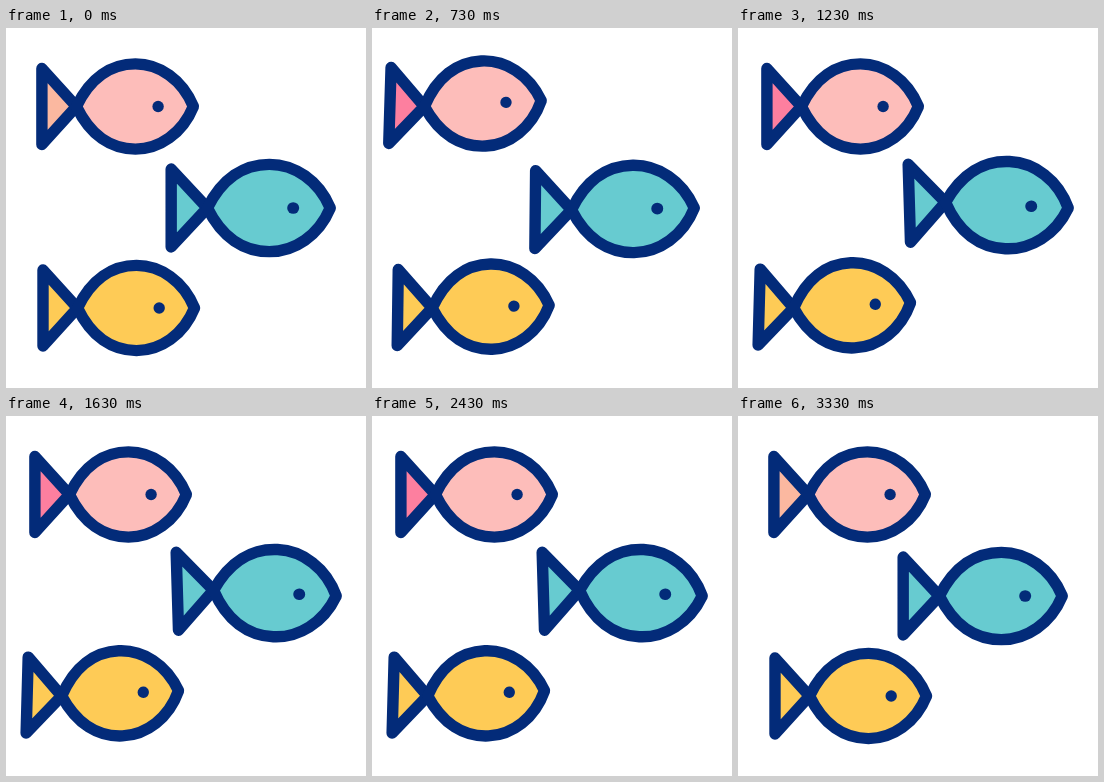
Recreate the animation shown at these times as an HTML page without scripts. Size 360 by 360 pixels, loop 3.7 s.

```html
<!DOCTYPE html>
<html lang="en">
<head>
<meta charset="utf-8">
<title>Three swimming fish</title>
<style>
  @property --frame {
    syntax: "<number>";
    inherits: true;
    initial-value: 0;
  }

  html, body {
    margin: 0;
    width: 100%;
    height: 100%;
    overflow: hidden;
    background: #fff;
  }

  svg {
    display: block;
    width: 100vw;
    height: 100vh;
  }

  /* Each fish sways on a 12-frame wave that builds up, holds and settles. */
  .fish {
    --grow: pow(clamp(0, var(--frame) / 18, 1), var(--ramp));
    --settle: pow(clamp(0, (100 - var(--frame)) / 11, 1), 2);
    --amp: calc(var(--grow) * var(--settle));
    --wave: cos((var(--frame) - var(--peak)) * 30deg);
    --tilt: calc(2.9deg * var(--amp) * var(--wave));
    animation: swim 3700ms -4ms infinite;
  }

  @keyframes swim {
    from { --frame: 0; animation-timing-function: steps(100); }
    90%, to { --frame: 100; }
  }

  .pink {
    --peak: 4; --ramp: 2; --drift: -7px; --sway: 11px; --pivot: 0px;
    --skin: #fdbdba;
    --fin: color-mix(in srgb, #fd7f9f calc(var(--amp) * 100%), #fbb8a0);
  }
  .teal {
    --peak: 1.6; --ramp: 4; --drift: 0px; --sway: 6px; --pivot: 117px;
    --skin: #67cbd0; --fin: #67cbd0;
  }
  .yellow {
    --peak: 6.1; --ramp: 1; --drift: -6.5px; --sway: 10.5px; --pivot: 0px;
    --skin: #fecb56; --fin: #fecb56;
  }

  .swimmer {
    transform-origin: var(--pivot) 0px;
    transform:
      translateX(calc(var(--amp) * (var(--drift) + var(--sway) * var(--wave))))
      rotate(var(--tilt));
    stroke: #032b79;
    stroke-width: 11.4;
    stroke-linejoin: round;
  }

  /* The tail counters the tilt of the body. */
  .tail {
    fill: var(--fin);
    transform-origin: 0 0;
    transform: rotate(calc(var(--tilt) * -1.6));
  }

  .body { fill: var(--skin); }
  .tail, .body { vector-effect: non-scaling-stroke; }
  .eye { fill: #032b79; stroke: none; }
</style>
</head>
<body>
<svg viewBox="0 0 360 360">
  <defs>
    <g id="fish" class="swimmer">
      <path class="tail" d="M0 0L-34.5 -38V38Z"/>
      <path class="body" d="M0 0C14 -29 35 -42.6 59 -42.6S106 -27 117 0C106 27 83 42.6 59 42.6S14 29 0 0Z"/>
      <circle class="eye" cx="81.7" r="5.7"/>
    </g>
  </defs>
  <g class="fish pink" transform="translate(70.4 78.5)"><use href="#fish"/></g>
  <g class="fish teal" transform="translate(201.4 180) scale(1.05 1.025)"><use href="#fish"/></g>
  <g class="fish yellow" transform="translate(71.5 280)"><use href="#fish"/></g>
</svg>
</body>
</html>
```
